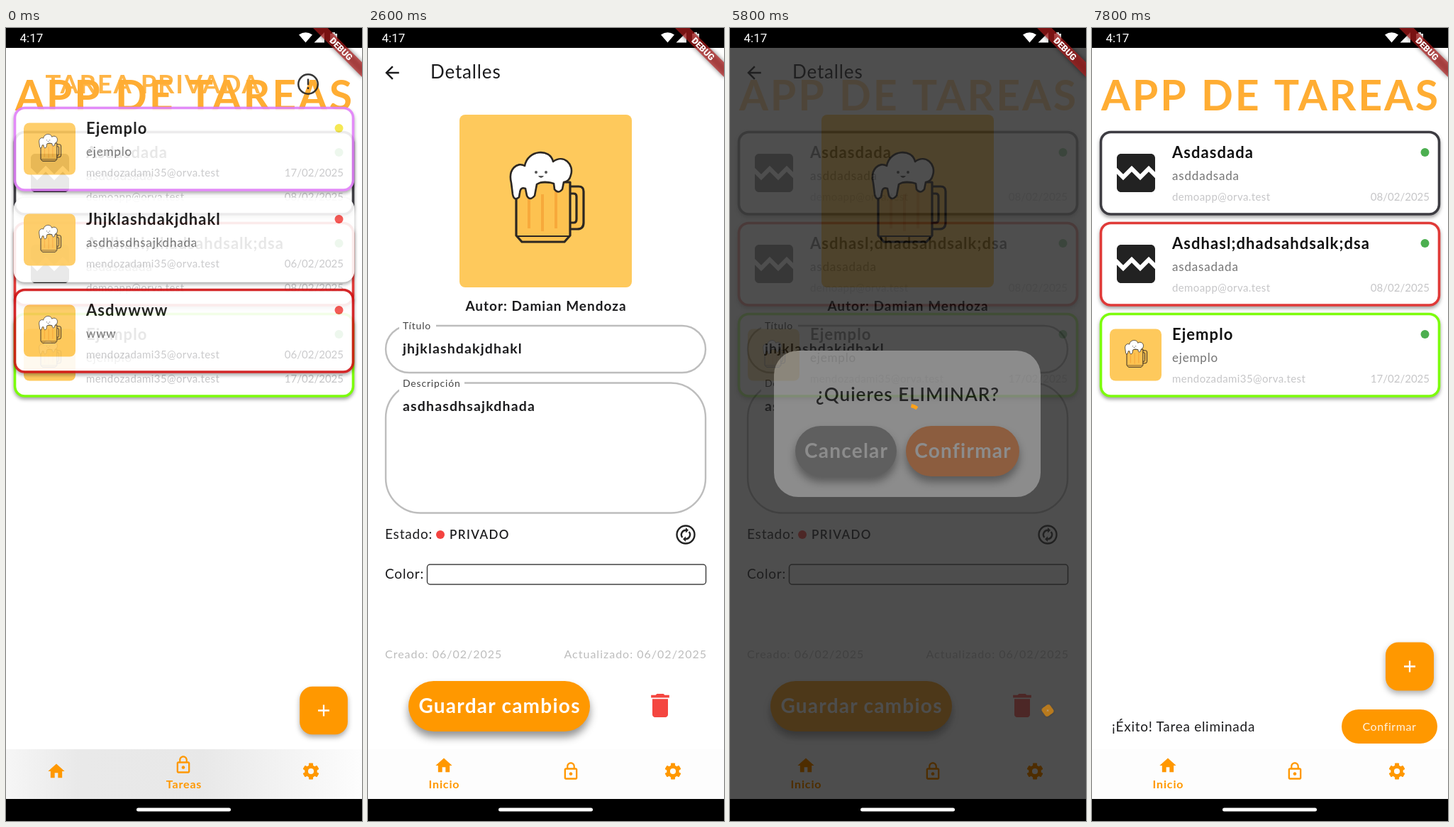
An HTML page that plays this animation: 502 by 1116 pixels, repeating every 8000 ms.

```html
<!DOCTYPE html>
<html lang="es">
<head>
<meta charset="utf-8">
<title>App de tareas</title>
<style>
html, body { margin: 0; width: 100%; height: 100%; overflow: hidden; background: #fff; }
svg#stage { display: block; width: 100vw; height: 100vh; }
text { font-family: Lato, "Open Sans", sans-serif; fill: #1c1c1e; white-space: pre; }
.b { font-weight: 700; }
.mid { text-anchor: middle; }
.end { text-anchor: end; }
.head { font-size: 59px; letter-spacing: 2.8px; word-spacing: 3px; fill: #ffad33; font-weight: 700; }
.sub-head { font-size: 36.5px; letter-spacing: 1.7px; word-spacing: 2px; fill: #ffad33; font-weight: 700; }
.name { font-size: 22px; letter-spacing: 1.05px; fill: #111; }
.note { font-size: 17px; letter-spacing: .82px; fill: #757575; }
.mail { font-size: 15px; letter-spacing: .4px; fill: #c6c6c8; }
.date { font-size: 15px; fill: #c6c6c8; }
.bar { font-size: 26px; letter-spacing: .85px; }
.author { font-size: 19px; letter-spacing: 1px; }
.label { font-size: 14px; letter-spacing: .8px; fill: #444; }
.input { font-size: 19.5px; letter-spacing: 1.15px; }
.row { font-size: 19px; letter-spacing: .8px; }
.state { font-size: 17px; letter-spacing: 1.4px; font-weight: 600; }
.stamp { font-size: 16px; letter-spacing: 1px; fill: #bdbdbd; }
.btn { font-size: 28px; letter-spacing: 1.25px; fill: #fff; }
.ask { font-size: 26px; letter-spacing: 1px; font-weight: 600; }
.snack { font-size: 19px; letter-spacing: .72px; }
.ok { font-size: 16px; letter-spacing: .6px; fill: #fff3df; }
.tab { font-size: 16px; letter-spacing: .85px; fill: #ff9800; }
.clock { font: 17px Roboto, sans-serif; fill: #fff; }
.debug { font: 900 12.4px Roboto, sans-serif; fill: #fff; }
.card { filter: drop-shadow(0 3px 2.5px rgba(0,0,0,.36)); }
.raised { filter: drop-shadow(0 8px 6px rgba(0,0,0,.42)); }
.float { filter: drop-shadow(0 4px 4px rgba(0,0,0,.32)); }
</style>
</head>
<body>
<svg id="stage" viewBox="0 0 502 1116" preserveAspectRatio="none">
  <defs>
    <linearGradient id="press">
      <stop offset="0" stop-color="#f6f6f6"/><stop offset=".2" stop-color="#e9e9e9"/>
      <stop offset=".55" stop-color="#e8e8e8"/><stop offset="1" stop-color="#fdfdfd"/>
    </linearGradient>
    <filter id="soft" x="-20%" y="-100%" width="140%" height="300%"><feGaussianBlur stdDeviation="3"/></filter>
    <symbol id="mug" viewBox="0 0 243 243" preserveAspectRatio="xMidYMid slice">
      <g stroke="#2c2722" stroke-width="3.2" stroke-linejoin="round">
        <path d="M153 101H168Q175 101 175 108V152Q175 161 166 161H153V152H161Q165 152 165 147V115Q165 111 161 111H153Z" fill="#fcc04d"/>
        <path d="M80 95H156V170L148 179H88L80 170Z" fill="#fdc250"/>
        <path d="M82 171H154" stroke-width="2"/>
        <path d="M98 112V160M117 112V164M136 108V160" stroke="#f7a93b" stroke-width="4"/>
        <path d="M73 96C68 76 82 66 92 72C96 49 128 47 132 66C147 55 162 70 157 85Q155 94 147 95L145 105Q139 112 134 105L133 97Q118 92 109 98L106 114Q99 122 95 114L93 104Q86 101 85 110L84 116Q77 122 75 112Z" fill="#fff" stroke-width="2.6"/>
      </g>
      <g fill="#555"><circle cx="108" cy="81" r="2"/><circle cx="122" cy="81" r="2"/><path d="M111 86Q115 92 119 86Z"/></g>
    </symbol>
  </defs>
  <rect width="502" height="1116" fill="#fff"/>
  <g id="homeUnder"></g>
  <g id="privateList"></g>
  <g id="details"></g>
  <g id="hero"></g>
  <g id="nav"></g>
  <rect id="barrier" y="28" width="502" height="1057"/>
  <circle id="splash" cx="412" cy="953" r="32" fill="#fff"/>
  <g id="dialog"></g>
  <rect id="loadBarrier" y="28" width="502" height="1057"/>
  <path id="spinner" fill="none" stroke="#ff9800" stroke-width="5"/>
  <g id="homeOver"></g>
  <g id="fab"></g>
  <g id="navOver"></g>
  <g id="system"></g>
</svg>
<script>
const $ = id => document.getElementById(id);
const ORANGE = '#ff9800', LOOP = 8000;
const MAIL = 'mendozadami35@orva.test', DEMO = 'demoapp@orva.test';

const clamp = v => Math.max(0, Math.min(1, v));
const span = (t, from, to) => clamp((t - from) / (to - from));
const mix = (a, b, k) => a + (b - a) * k;
const settle = x => 1 - (1 - x * x * (3 - 2 * x)) ** 2.2;
const set = (id, attrs) => { for (const k in attrs) $(id).setAttribute(k, attrs[k]); };

const text = (x, y, str, cls) => `<text x="${x}" y="${y}" class="${cls}">${str}</text>`;
const box = (x, y, w, h, r, fill, more = '') =>
  `<rect x="${x}" y="${y}" width="${w}" height="${h}" rx="${r}" fill="${fill}" ${more}/>`;
const dot = (x, y, r, fill) => `<circle cx="${x}" cy="${y}" r="${r}" fill="${fill}"/>`;
const at = (x, y, size, body, fill) =>
  `<g transform="translate(${x} ${y}) scale(${size / 24}) translate(-12 -12)" fill="${fill}">${body}</g>`;
const path = d => `<path d="${d}"/>`;

const tooth = a => `<rect x="9.4" y="2.2" width="5.2" height="5" rx=".8" transform="rotate(${a} 12 12)"/>`;
const icons = {
  home: path('M10 20v-6h4v6h5v-8h3L12 3 2 12h3v8z'),
  lock: path('M12 17c1.1 0 2-.9 2-2s-.9-2-2-2-2 .9-2 2 .9 2 2 2zm6-9h-1V6c0-2.76-2.24-5-5-5S7 3.24 7 6v2H6c-1.1 0-2 .9-2 2v10c0 1.1.9 2 2 2h12c1.1 0 2-.9 2-2V10c0-1.1-.9-2-2-2zM8.9 6c0-1.71 1.39-3.1 3.1-3.1s3.1 1.39 3.1 3.1v2H8.9V6zM18 20H6V10h12v10z'),
  gear: `<circle cx="12" cy="12" r="5.5" fill="none" stroke="${ORANGE}" stroke-width="4"/>` + [0, 60, 120, 180, 240, 300].map(tooth).join(''),
  back: path('M20 11H7.83l5.59-5.59L12 4l-8 8 8 8 1.41-1.41L7.83 13H20v-2z'),
  trash: path('M6 19c0 1.1.9 2 2 2h8c1.1 0 2-.9 2-2V7H6v12zM19 4h-3.5l-1-1h-5l-1 1H5v2h14V4z'),
  broken: path('M21 5v6.59l-3-3.01-4 4.01-4-4-4 4-3-3.01V5c0-1.1.9-2 2-2h14c1.1 0 2 .9 2 2zm-3 6.42l3 3.01V19c0 1.1-.9 2-2 2H5c-1.1 0-2-.9-2-2v-6.58l3 2.99 4-4 4 4 4-3.99z'),
  alert: '<g fill="none" stroke="#222" stroke-width="2"><circle cx="12" cy="12" r="11"/><path d="M12 6v7M12 15.4v2.2"/></g>',
  sync: '<g fill="none" stroke="#222" stroke-width="1.9"><circle cx="12" cy="12" r="10"/><path d="M8.3 15.2A5 5 0 0 1 12.5 7M15.7 8.8A5 5 0 0 1 11.5 17"/></g><path d="M12 4l3.2 3L12 10zM12 14v6l-3.2-3z"/>'
};

const photo = (x, y, w, h, r) =>
  box(x, y, w, h, r, '#fec95c') + `<use href="#mug" x="${x}" y="${y}" width="${w}" height="${h}"/>`;

function card(y, color, name, note, mail, date, mark, picture) {
  const art = {
    mug: photo(25, y + 21.5, 73, 73, 8),
    broken: at(62, y + 58, 72, icons.broken, '#222'),
    none: ''
  }[picture];
  return box(12.5, y + .5, 477, 115.5, 14, '#fff', `stroke="${color}" stroke-width="3.6" class="card"`) + art +
    text(113, y + 37, name, 'name b') + text(113, y + 68, note, 'note') +
    text(113, y + 97, mail, 'mail') + text(476, y + 97, date, 'date end') + dot(469.5, y + 29, 6, mark);
}

const home = () => text(252, 116, 'APP DE TAREAS', 'head mid') +
  card(146, '#3d3c42', 'Asdasdada', 'asddadsada', DEMO, '08/02/2025', '#4caf50', 'broken') +
  card(274, '#e03a38', 'Asdhasl;dhadsahdsalk;dsa', 'asdasadada', DEMO, '08/02/2025', '#4caf50', 'broken') +
  card(402, '#7cfc0c', 'Ejemplo', 'ejemplo', MAIL, '17/02/2025', '#4caf50', 'mug');

const privateList = () => text(207.5, 92, 'TAREA PRIVADA', 'sub-head mid') + at(426, 79, 30, icons.alert, '#222') +
  card(112, '#e07ff8', 'Ejemplo', 'ejemplo', MAIL, '17/02/2025', '#f5e642', 'mug') +
  card(240, '#fff', 'Jhjklashdakjdhakl', 'asdhasdhsajkdhada', MAIL, '06/02/2025', '#f44b47', 'none') +
  card(368, '#d01012', 'Asdwwww', 'www', MAIL, '06/02/2025', '#f44b47', 'mug');

const field = (y, h, r, gap, label, value) =>
  box(25, y, 451, h, r, 'none', 'stroke="#bdbdbd" stroke-width="2.4"') + box(44, y - 6, gap, 18, 0, '#fff') +
  text(49, y + 5, label, 'label') + text(49, y + 39, value, 'input b');

const pill = (x, y, w, fill, label, id = '') =>
  box(x, y, w, 71, 35.5, fill, `class="raised" ${id}`) + text(x + w / 2 + .6, y + 45, label, 'btn b mid');

const details = () => box(0, 28, 502, 987, 0, '#fff') + at(34, 63, 29.3, icons.back, '#1c1c1e') +
  text(88, 71, 'Detalles', 'bar') + text(251, 398, 'Autor: Damian Mendoza', 'author b mid') +
  field(419, 66, 33, 52, 'Título', 'jhjklashdakjdhakl') +
  field(499.5, 183, 49, 92, 'Descripción', 'asdhasdhsajkdhada') +
  text(24, 719, 'Estado:', 'row') + dot(102, 713, 6, '#f44340') + text(115, 719, 'PRIVADO', 'state') +
  at(448, 713, 30, icons.sync, '#222') + text(24, 775, 'Color:', 'row') +
  box(83.5, 755, 393, 28, 4, '#fff', 'stroke="#444" stroke-width="1.5"') +
  text(24, 887, 'Creado: 06/02/2025', 'stamp') + text(478, 887, 'Actualizado: 06/02/2025', 'stamp end') +
  pill(57, 919, 256, ORANGE, 'Guardar cambios') + at(412, 953.5, 44, icons.trash, '#f44640');

const dialog = () => box(62, 454, 376, 206, 34, '#fff') + text(250.5, 525, '¿Quieres ELIMINAR?', 'ask mid') +
  pill(92, 560, 143, '#9e9e9e', 'Cancelar') + pill(248, 560, 160, ORANGE, 'Confirmar', 'id="confirm"');

// k: 0 = second tab selected, 1 = first tab selected
const nav = (k, pressed = 0) => box(0, 1015, 502, 70, 0, '#fdfdfd') +
  box(0, 1015, 502, 70, 0, 'url(#press)', `opacity="${pressed}"`) +
  at(71 + 36 * k, 1046 - 8 * k, 28, icons.home, ORANGE) +
  at(250 + 36 * k, 1037 + 9 * k, 28, icons.lock, ORANGE) + at(430, 1046, 28, icons.gear, ORANGE) +
  `<g opacity="${k}">${text(107.5, 1070, 'Inicio', 'tab b mid')}</g>` +
  `<g opacity="${1 - k}">${text(251, 1070, 'Tareas', 'tab b mid')}</g>`;

const snack = () => `<g id="snack">${text(28, 990, '¡Éxito! Tarea eliminada', 'snack')}` +
  box(352, 959, 135, 48, 24, ORANGE) + text(419.5, 989, 'Confirmar', 'ok mid') + '</g>';

const system = () => box(0, 0, 502, 28, 0, '#000') + box(0, 1085, 502, 31, 0, '#000') +
  box(184, 1097.5, 133, 5, 2.5, '#fff') + text(19.5, 20, '4:17', 'clock') +
  '<path d="M413 9.5Q422.5 3 432 9.5L422.5 20.5ZM449 6V20.5H434.5ZM457 8H460V6H464V8H467V20.5H457Z" fill="#fff"/>' +
  `<g transform="translate(502 0) rotate(45)">${box(-49, 34.2, 98, 14.6, 0, '#000', 'opacity=".5" filter="url(#soft)"')}` +
  box(-70, 34.2, 140, 14.6, 0, '#b71c1c', 'opacity=".66"') + text(0, 46, 'DEBUG', 'debug mid') + '</g>';

$('homeUnder').innerHTML = home();
$('privateList').innerHTML = privateList();
$('details').innerHTML = details();
$('dialog').innerHTML = dialog();
$('homeOver').innerHTML = box(0, 28, 502, 987, 0, '#fff') + home() + snack();
$('fab').innerHTML = box(-34, -34, 68, 68, 18, ORANGE, 'class="float"') +
  '<path d="M-8 0H8M0-8V8" stroke="#fff" stroke-width="2.3"/>';
$('navOver').innerHTML = nav(1);
$('system').innerHTML = system();

function heroImage(t) {
  const k = settle(span(t, 650, 950)), across = 1 - (1 - k) ** 1.5;
  const left = mix(25, 129, across), right = mix(98, 372, across);
  const top = mix(261.5, 122, k), bottom = mix(334.5, 365, k);
  return photo(left, top, right - left, bottom - top, 8);
}

function spinnerArc(t) {
  const start = (t - 5760) / 1000 * 5, sweep = .08 + span(t, 5760, 6060) * 2.5;
  const point = a => `${251 + 22 * Math.sin(a)} ${553 - 22 * Math.cos(a)}`;
  return `M${point(start)}A22 22 0 0 1 ${point(start + sweep)}`;
}

function render(t) {
  const listIn = mix(.9, 1, span(t, 0, 100));
  const opened = span(t, 650, 950);
  const asked = span(t, 4400, 4600);
  const pressed = span(t, 5500, 5700);
  const returned = span(t, 5775, 6040);
  const raised = settle(span(t, 5900, 6180));

  set('homeUnder', { opacity: 1 - span(t, 0, 200) });
  set('privateList', { opacity: opened < 1 ? listIn : 0 });
  set('details', { opacity: opened ** .75 });
  set('hero', { opacity: listIn });
  $('hero').innerHTML = heroImage(t);
  $('nav').innerHTML = nav(settle(span(t, 520, 790)), 1 - span(t, 0, 300));

  set('barrier', { opacity: .54 * asked });
  set('splash', { opacity: .13 * asked * (1 - span(t, 4700, 5100)) });
  set('dialog', { opacity: asked });
  set('confirm', { fill: `rgb(255 152 ${mix(0, 85, pressed)})` });
  set('loadBarrier', { opacity: .5 * span(t, 5520, 5750) });
  set('spinner', { d: spinnerArc(t), opacity: t > 5760 && t < 6040 ? 1 : 0 });

  set('homeOver', { opacity: returned });
  set('navOver', { opacity: returned });
  set('snack', { transform: `translate(0 ${62 * (1 - raised)})`, opacity: raised > 0 ? 1 : 0 });

  const leaving = t < 3000;
  const scale = leaving ? 1 - span(t, 0, 200) : span(t, 5755, 5975);
  const turn = leaving ? 0 : -45 * (1 - scale);
  set('fab', {
    transform: `translate(448 ${960.5 - 62 * raised}) rotate(${turn}) scale(${scale})`,
    opacity: scale && mix(.5, 1, scale)
  });
}

const begin = performance.now();
function tick() {
  render((performance.now() - begin) % LOOP);
  requestAnimationFrame(tick);
}
render(0);
requestAnimationFrame(tick);
</script>
</body>
</html>
```
